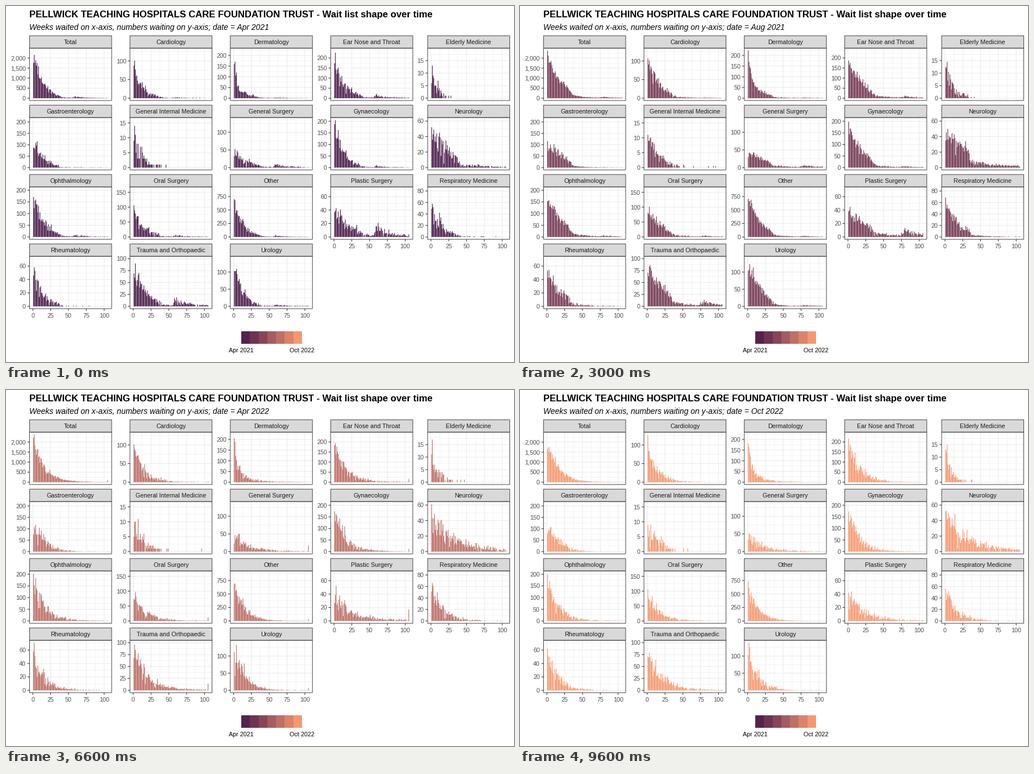
Animation of 894x626 px, one loop 10000 ms. Source, as a matplotlib script:

```python
import numpy as np
import matplotlib.pyplot as plt
from matplotlib.animation import FuncAnimation
from matplotlib.collections import LineCollection, PolyCollection
from matplotlib.colors import LinearSegmentedColormap
from matplotlib.patches import Rectangle

W, H, DPI = 894, 626, 100
PX = 72 / DPI
plt.rcParams["font.family"] = "Liberation Sans"

# Panel layout in pixels
LEFT = [41.35, 218.0, 394.65, 571.3, 741.94]
TOP, PITCH = 52.2, 122
PW, PH, STRIP = 144.7, 92.2, 21.9
WEEKS = np.arange(1, 106)
X_LOW, X_SPAN = -4.695, 115.39
UNIT = PW / X_SPAN
STEPS = [5, 20, 25, 50, 250, 500]

# Timeline: each month holds, with one halfway step before the next
STARTS = [0, 7, 13, 19, 25, 31] + list(range(36, 97, 5))
FRAMES, LAST = 100, 18
MONTHS = "Jan Feb Mar Apr May Jun Jul Aug Sep Oct Nov Dec".split()
DATES = [f"{MONTHS[(k + 3) % 12]} {2021 + (k + 3) // 12}" for k in range(LAST + 1)]
WEEKS_PER_MONTH = 4.35

cmap = LinearSegmentedColormap.from_list("dusk", [
    (0, "#4B1D4B"), (0.39, "#8A4959"), (0.53, "#A45D5F"),
    (0.78, "#CF7C68"), (1, "#F6986D")])


class Panel:
    """top: axis maximum, peak and scale: decay curve, old: size of the backlog."""

    def __init__(self, name, top, peak, scale, old=0, shape=1):
        self.name, self.top, self.peak = name, top, peak
        self.scale, self.old, self.shape = scale, old, shape
        self.step = next(s for s in STEPS if top / s < 5)

    def expected(self, m):
        """Smooth waiting curve in month m."""
        stretch = np.interp(m, [0, 3, 4.5, 7, 14], [1, 1.35, 1.6, 1.5, 1.1])
        edge = np.interp(m, [0, 3, 4.5, 7, 9.5], [38, 29, 36, 33, 24])
        rest = np.interp(m, [7, 9.5, 14], [0.35, 0.6, 1])
        curve = self.peak * np.exp(-(WEEKS / (self.scale * stretch)) ** self.shape)
        curve *= rest + (1 - rest) / (1 + np.exp((WEEKS - edge) / 1.2))
        # The old backlog drifts right and piles up in the last week
        d = WEEKS - (59 + WEEKS_PER_MONTH * m)
        hump = np.where(d < 0, np.exp(-(d / 2) ** 2), np.exp(-np.abs(d) / 14))
        curve += self.old * np.exp(-m / 14) * (hump + 0.1)
        curve[-1] += 3 * self.old * np.exp(-((m - 9.5) / 3.2) ** 2)
        return curve

    def simulate(self, seed):
        """Counts per month and week; part of the noise travels with each intake."""
        rng = np.random.default_rng(seed)
        intake = rng.normal(size=200)
        months = []
        for m in range(LAST + 1):
            curve = self.expected(m)
            born = round(WEEKS_PER_MONTH * m) - WEEKS
            z = 0.75 * intake[born + 105] + 0.65 * rng.normal(size=105)
            spread = 0.1 + 1 / np.sqrt(curve + 4)
            holiday = 1 - 0.4 * np.exp(-((born - 33) / 1.4) ** 2)
            noisy = curve * holiday * np.clip(1 + spread * z, 0.1, 2.2)
            months.append(np.minimum(np.floor(noisy + rng.random(105)), self.top))
        return np.array(months)


panels = [
    Panel("Total", 2375, 2150, 13.5, 65),
    Panel("Cardiology", 128, 100, 12, 1.2),
    Panel("Dermatology", 223, 300, 3, 1.7, shape=0.55),
    Panel("Ear Nose and Throat", 237, 195, 14, 12),
    Panel("Elderly Medicine", 19, 13, 7),
    Panel("Gastroenterology", 209, 100, 18, 0.8, shape=1.4),
    Panel("General Internal Medicine", 16, 11, 11),
    Panel("General Surgery", 135, 45, 18, 7),
    Panel("Gynaecology", 206, 185, 13, 5),
    Panel("Neurology", 61.5, 46, 29),
    Panel("Ophthalmology", 204, 180, 14, 6),
    Panel("Oral Surgery", 160, 90, 14, 4),
    Panel("Other", 883, 740, 12, 18),
    Panel("Plastic Surgery", 71, 38, 20, 13),
    Panel("Respiratory Medicine", 83, 62, 13, 0.3),
    Panel("Rheumatology", 71, 55, 13),
    Panel("Trauma and Orthopaedic", 100, 80, 17, 11),
    Panel("Urology", 139, 112, 14, 4, shape=1.15),
]

fig = plt.figure(figsize=(W / 100, H / 100), dpi=DPI, facecolor="white")
ax = fig.add_axes([0, 0, 1, 1])
ax.set_xlim(0, W)
ax.set_ylim(H, 0)
ax.axis("off")


def label(x, y, s, size=10.8, color="#4D4D4D", ha="center", **kw):
    return ax.text(x, y, s, fontsize=size * PX, color=color, ha=ha,
                   va="baseline", **kw)


def box(x, y, w, h, z, fill):
    """Frame whose outline sits just inside the given area."""
    ax.add_patch(Rectangle((x + 0.1, y + 0.1), w - 0.2, h - 0.2, lw=0.9 * PX,
                           fc=fill, ec="#333333", zorder=z, snap=False))


minor, major, ticks = [], [], []
bar_left, bar_base, bar_scale = [], [], []

for i, p in enumerate(panels):
    row, col = divmod(i, 5)
    x0, y0 = LEFT[col], TOP + PITCH * row
    x1, yt, yb = x0 + PW, y0 + STRIP, y0 + STRIP + PH
    scale = PH / 1.1 / p.top
    base = yb - PH / 22
    lowest = i + 5 >= len(panels)

    for k in range(9):
        v = 12.5 * k
        x = x0 + (v - X_LOW) * UNIT
        (minor if k % 2 else major).append([(x, yt), (x, yb)])
        if k % 2 == 0 and lowest:
            ticks.append([(x, yb), (x, yb + 3.67)])
            label(x, yb + 15.4, f"{v:.0f}")

    for k, v in enumerate(np.arange(0, 1.05 * p.top, p.step / 2)):
        y = base - v * scale
        (minor if k % 2 else major).append([(x0, y), (x1, y)])
        if k % 2 == 0:
            ticks.append([(x0 - 3.67, y), (x0, y)])
            label(x0 - 6.4, y + 4, f"{v:,.0f}", ha="right")

    box(x0, yt, PW, PH, 5, "none")
    box(x0, y0, PW, STRIP, 6, "#D9D9D9")
    label(x0 + PW / 2, y0 + 15.2, p.name, color="#1A1A1A", zorder=7)

    bar_left.append(x0 + (WEEKS - 0.45 - X_LOW) * UNIT)
    bar_base.append(np.full(105, base))
    bar_scale.append(np.full(105, scale))

for lines, color, width, z in [(minor, "#EBEBEB", 0.55, 1),
                               (major, "#EBEBEB", 1.07, 2),
                               (ticks, "#333333", 1.07, 4)]:
    grid = LineCollection(lines, colors=color, linewidths=width * PX, zorder=z)
    grid.set_snap(False)
    ax.add_collection(grid, autolim=False)

bl, bb, bs = map(np.concatenate, (bar_left, bar_base, bar_scale))
br = bl + 0.9 * UNIT
counts = np.hstack([p.simulate(40 + i) for i, p in enumerate(panels)])
bars = PolyCollection([], linewidths=0, edgecolors="none", zorder=3)
bars.set_snap(False)
ax.add_collection(bars, autolim=False)

label(41, 20.3, "PELLWICK TEACHING HOSPITALS CARE FOUNDATION TRUST"
      " - Wait list shape over time", 16.6, "black", "left", weight="bold")
subtitle = label(41, 42, "", 13.9, "black", "left", style="italic")

edges = np.round(np.linspace(414, 521, 8))
for a, b, t in zip(edges[:-1], edges[1:], np.linspace(0.05, 1, 7)):
    ax.add_patch(Rectangle((a, 572), b - a, 22, lw=0, fc=cmap(t)))
label(414, 609, DATES[0], color="black")
label(521, 609, DATES[-1], color="black")


def draw(frame):
    k = int(np.searchsorted(STARTS, frame, "right")) - 1
    n, pos = counts[k], float(k)
    if frame + 1 in STARTS:
        n, pos = (n + counts[k + 1]) / 2, k + 0.5
    on = n > 0
    top = bb - n * bs
    corners = [(bl, bb), (bl, top), (br, top), (br, bb)]
    verts = np.stack([np.stack(c, axis=1) for c in corners], axis=1)
    bars.set_verts(verts[on])
    bars.set_facecolor(cmap(pos / LAST))
    subtitle.set_text("Weeks waited on x-axis, numbers waiting on y-axis; "
                      f"date = {DATES[k]}")
    return bars, subtitle


anim = FuncAnimation(fig, draw, frames=FRAMES, interval=100, repeat=True,
                     repeat_delay=0, init_func=lambda: draw(0))
plt.show()
```
